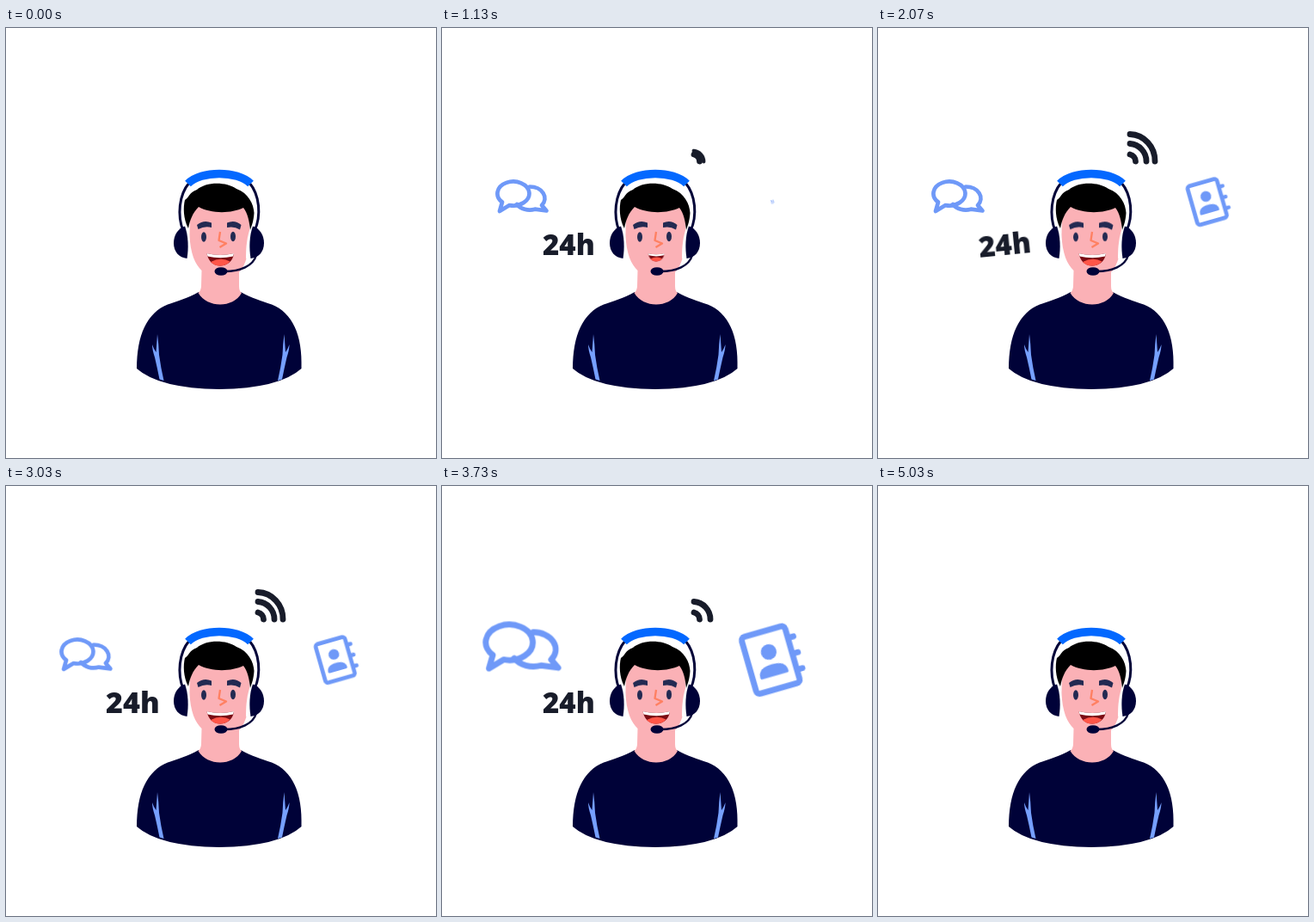
An HTML page for the animation above (5060 ms loop, 500 px wide and 500 px high).

```html
<!DOCTYPE html>
<html lang="en">
<head>
<meta charset="utf-8">
<title>Support agent</title>
<style>
  html, body { margin: 0; width: 100%; height: 100%; overflow: hidden; background: #fff; }
  svg { display: block; width: 100%; height: 100%; }
  .navy { fill: #000238; }
  .wire { fill: none; stroke: #000238; stroke-linecap: round; }
  .skin { fill: #fbb1b6; }
  .ink { fill: #232a52; }
  .icon { fill: none; stroke: #6f99f8; stroke-width: 4.7; stroke-linejoin: round; stroke-linecap: round; }
  .solid { fill: #6f99f8; }
  .wifi { fill: none; stroke: #181c2a; stroke-width: 6.8; stroke-linecap: round; }
  .label { font: 800 33px "Open Sans", sans-serif; fill: #181c2a; }

  .anim { animation: 5060ms linear infinite; }
  .rise { animation-name: rise; transform-origin: 147px 264px; }
  .wave { animation-name: wave; transform-origin: 147px 252px; }
  .chat { animation-name: chat; transform-origin: 93px 215px; }
  .book { animation-name: book; transform-origin: 384px 202px; }
  .pulse { animation-name: pulse; transform-origin: inherit; }
  .near, .mid, .far { transform-origin: 292px 156px; }
  .near { animation-name: near; }
  .mid { animation-name: mid; }
  .far { animation-name: far; }
  .talk { animation-name: talk; transform-origin: 249px 262px; }
  .blink { animation-name: blink; transform-origin: 247px 243px; }
  .brows { animation-name: brows; }

  @keyframes rise {
    0%, .7% { transform: scaleY(0); }
    16.8%, 89.53% { transform: none; }
    99.3%, 100% { transform: scaleY(0); }
  }
  @keyframes wave {
    0%, 32.21% { transform: rotate(0deg) scale(1); animation-timing-function: cubic-bezier(.39,.575,.565,1); }
    34.29%, 42.59% { transform: rotate(-18deg) scale(1); animation-timing-function: cubic-bezier(.37,0,.63,1); }
    38.44% { transform: rotate(18deg) scale(1); animation-timing-function: cubic-bezier(.37,0,.63,1); }
    46.74% { transform: rotate(18deg) scale(1); animation-timing-function: cubic-bezier(.47,0,.745,.715); }
    48.81%, 59.88% { transform: rotate(0deg) scale(1.03); }
    69.76%, 100% { transform: rotate(0deg) scale(1); }
  }
  @keyframes chat {
    0%, 11.26% { transform: scale(0); }
    21.15%, 89.53% { transform: scale(1); }
    99.3%, 100% { transform: scale(0); }
  }
  @keyframes book {
    0%, 21.5% { transform: scale(0); }
    31.62%, 89.53% { transform: scale(1); }
    99.3%, 100% { transform: scale(0); }
  }
  @keyframes pulse {
    0%, 59.88% { transform: scale(1); animation-timing-function: cubic-bezier(.39,.575,.565,1); }
    64.82% { transform: scale(.5); animation-timing-function: cubic-bezier(.37,0,.63,1); }
    74.7% { transform: scale(1.5); animation-timing-function: cubic-bezier(.47,0,.745,.715); }
    79.64%, 100% { transform: scale(1); }
  }
  @keyframes near {
    0%, 13.83% { transform: scale(0); }
    19.76%, 80.24% { transform: scale(1); }
    83%, 100% { transform: scale(0); }
  }
  @keyframes mid {
    0%, 19.76% { transform: scale(0); animation-timing-function: ease-out; }
    25.69%, 74.11% { transform: scale(1); animation-timing-function: ease-in; }
    79.64%, 100% { transform: scale(0); }
  }
  @keyframes far {
    0%, 25.69% { transform: scale(0); animation-timing-function: ease-out; }
    31.23%, 68.77% { transform: scale(1); animation-timing-function: ease-in; }
    73.52%, 100% { transform: scale(0); }
  }
  @keyframes talk {
    0%, 16.8% { transform: none; animation-timing-function: ease-in-out; }
    21.5%, 23% { transform: scale(.6, .65); animation-timing-function: ease-in-out; }
    27.7%, 100% { transform: none; }
  }
  @keyframes blink {
    0%, 10.87%, 14.62%, 40.51%, 44.27%, 70.16%, 73.91%, 100% { transform: none; animation-timing-function: ease-in-out; }
    12.75%, 42.39%, 72.04% { transform: scaleY(.12); animation-timing-function: ease-in-out; }
  }
  @keyframes brows {
    0%, 10.87%, 14.62%, 40.51%, 44.27%, 70.16%, 73.91%, 100% { transform: none; animation-timing-function: ease-in-out; }
    12.75%, 42.39%, 72.04% { transform: translateY(2px); animation-timing-function: ease-in-out; }
  }
</style>
</head>
<body>
<svg viewBox="0 0 500 500">
  <defs>
    <path id="cup" class="navy" d="M208 230.500C200 233 195 241 195 250C195 260 201 267 210.500 268C212.500 256 212 241 208 230.500Z"/>
    <path id="fold" fill="#76a0ff" d="M176 356Q177.500 367 178 380Q180 395 183.500 410L178.500 408.500Q176 396 173 383Q170 374 170 368Q172 374 174.500 377Z"/>
  </defs>

  <!-- body -->
  <path class="navy" d="M224 307C212 314 198 318 188 321.500C164 331 152 357 152 396Q178 419 248 420Q318 419 343.500 396C345 357 333 331 309 321.500C299 318 285 314 273 307Z"/>
  <use href="#fold"/>
  <use href="#fold" transform="matrix(-1 0 0 1 499.500 0)"/>

  <!-- head -->
  <path class="skin" d="M214 205L213.500 240C214 262 220 275 227.500 282L227 300Q227 305 223.500 308C229 317 239 321.500 249 321.500C259 321.500 269 317 274 308Q271 306 271 300L271 284C279 276 283 260 283 240L284 205Z"/>
  <path fill="#fff" d="M285 230C280 242 279 255 279 268L288 268L288 230Z"/>
  <path d="M212 233C206 222 206 208 208 200C214 196 212 192 222 188C232 179 255 178 268 187C282 192 288 205 288.500 215C288 224 286 229 284 235C283 225 281 215 276 209C262 216 238 216 224 208C217 215 214 223 212 233Z"/>

  <g class="anim brows ink">
    <path d="M222 229Q230 222.500 239 226.500L239 232Q231 230 223.500 234Z"/>
    <path d="M257 226.500Q266 222.500 273.500 229L272 234.500Q265 230 257 232Z"/>
  </g>
  <g class="anim blink ink">
    <ellipse cx="230" cy="243" rx="3" ry="5.800"/>
    <ellipse cx="264" cy="242.500" rx="3" ry="5.800"/>
  </g>
  <path d="M249 237L247.500 247L256 250.500L248.500 255" fill="none" stroke="#ff8062" stroke-width="2.300" stroke-linejoin="round"/>
  <g class="anim talk">
    <path fill="#7a0c14" d="M233.500 262Q249 266 265 262C264 272 256 276.500 249 276.500C241 276.500 235 271 233.500 262Z"/>
    <path fill="#ff5548" d="M238 272Q250 266 260.500 271.500Q256 276.500 249 276.500C244 276.500 241 275 238 272Z"/>
    <path fill="#fff" d="M233.500 262Q249 266 265 262L264 265.500Q249 269 234.500 265.500Z"/>
  </g>

  <!-- headset -->
  <path class="wire" stroke-width="3" d="M206 236C199 218 201 194 213 180M289 236C297 218 295 194 283 180"/>
  <path fill="none" stroke="#0368ff" stroke-width="9.500" d="M211.500 181C227 165.500 269 165.500 284.500 181"/>
  <use href="#cup"/>
  <use href="#cup" transform="matrix(-1 0 0 1 495 0)"/>
  <path class="wire" stroke-width="2.400" d="M291 264C287.500 277 272 283 254 283"/>
  <ellipse class="navy" cx="250" cy="283" rx="7.500" ry="4.800"/>

  <g class="anim rise"><g class="anim wave">
    <text class="label" x="117" y="264">24h</text>
  </g></g>

  <g class="anim chat"><g class="anim pulse icon">
    <path d="M67 213L70 202.500A18.500 14 0 1 1 78.500 206.100Z"/>
    <path d="M102 184.500A17.500 13.500 0 0 1 116 206.100L121.500 212.500L108 210.700A17.500 13.500 0 0 1 87 205"/>
  </g></g>

  <g class="wifi">
    <path class="anim near" d="M293 147A8.500 8.500 0 0 1 299.500 155"/>
    <path class="anim mid" d="M293 134.500A20.500 20.500 0 0 1 312 155"/>
    <path class="anim far" d="M293 123.500A30 31 0 0 1 322 155"/>
  </g>

  <g class="anim book"><g class="anim pulse"><g transform="translate(383.500 202) rotate(-16)">
    <rect class="icon" x="-18.500" y="-23.300" width="35.500" height="46.600" rx="3"/>
    <path class="icon" d="M18 -13H21.500M18 0H21.500M18 13H21.500"/>
    <circle class="solid" cx="-.5" cy="-6.500" r="6.200"/>
    <path class="solid" d="M-12.500 11.500C-12.500 6 -8 3.500 -1 3.500S10.500 6 10.500 11.500Q10.500 13 9 13H-11Q-12.500 13 -12.500 11.500Z"/>
  </g></g></g>
</svg>
</body>
</html>
```
